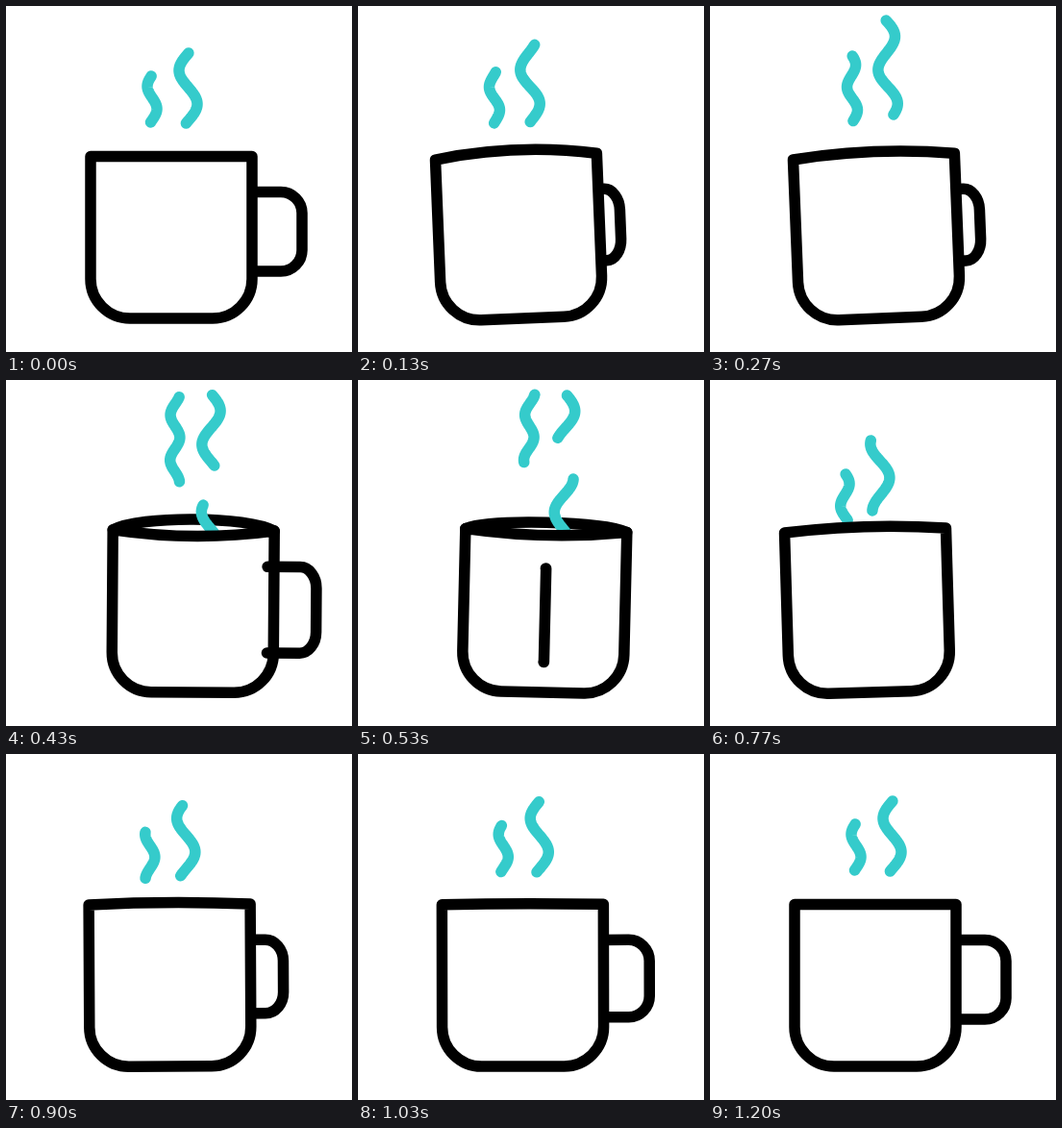
Recreate the animation shown at these times as an HTML page with a canvas. Size 360 px wide and 360 px high, loop 1670 ms.

```html
<!DOCTYPE html>
<html lang="en">
<head>
<meta charset="utf-8">
<title>Hot drink</title>
<style>
  html, body { margin: 0; height: 100%; overflow: hidden; background: #fff; }
  canvas { display: block; width: 360px; height: 360px; }
</style>
</head>
<body>
<canvas id="stage" width="360" height="360"></canvas>
<script>
const LOOP = 1670, SETTLED = 1200;

// The mug winds up, swings its handle across the front and comes round the back
const poses = [
  { time: 0, shift: 0, tilt: 0, turn: 0, bulge: 0 },
  { time: 190, shift: -1, tilt: -3, turn: -42, bulge: -9 },
  { time: 430, shift: 22, tilt: 0.4, turn: 28, bulge: 6 },
  { time: 630, shift: 15, tilt: 1.8, turn: 166, bulge: 3 },
  { time: 770, shift: -5.5, tilt: -1.7, turn: 275, bulge: -4 },
  { time: 900, shift: -1, tilt: -0.3, turn: 337, bulge: -2 },
  { time: SETTLED, shift: 0, tilt: 0, turn: 360, bulge: 0 }
];

// A wisp is the stretch of a fixed wave between top and bottom.
// topOut and bottomOut are the times at which its ends reach the ceiling.
const CEILING = 15.5;
const wisps = [
  { x: 152, swing: 5, crest: 107, period: 47, top: 73, bottom: 121,
    topOut: 440, bottomOut: 700, power: 4, rise: 57 },
  { x: 189.5, swing: 9.5, crest: 102, period: 70, top: 49, bottom: 122,
    topOut: 270, bottomOut: 636, power: 3, rise: 33 }
];

const ctx = document.getElementById('stage').getContext('2d');

// Monotone cubic interpolation, at rest at both ends
function pose(key, t) {
  const last = poses.length - 1;
  if (t >= SETTLED) return poses[last][key];
  const slope = i => (poses[i + 1][key] - poses[i][key]) / (poses[i + 1].time - poses[i].time);
  const tangent = i => {
    if (i === 0 || i === last) return 0;
    const a = slope(i - 1), b = slope(i);
    return a * b > 0 ? 2 * a * b / (a + b) : 0;
  };
  const i = poses.findIndex(p => p.time > t) - 1;
  const from = poses[i], to = poses[i + 1];
  const span = to.time - from.time, u = (t - from.time) / span, v = 1 - u;
  return from[key] * v * v * (1 + 2 * u) + to[key] * u * u * (3 - 2 * u)
    + span * u * v * (v * tangent(i) - u * tangent(i + 1));
}

function drawHandle(angle) {
  const c = Math.cos(angle), s = Math.sin(angle);
  const reach = r => 172 + r * c * (1 + 0.15 * s * r / 136);
  const inner = reach(84), outer = reach(136);
  const drop = 2.5 * (1 - c), top = 193.5 + drop, bottom = 276 + drop + 15 * s;
  const corner = outer - 22 * c * Math.abs(c), mid = corner + (outer - corner) * 0.55;
  ctx.beginPath();
  ctx.moveTo(inner, top);
  ctx.lineTo(corner, top);
  ctx.bezierCurveTo(mid, top, outer, top + 10, outer, top + 22);
  ctx.lineTo(outer, bottom - 22);
  ctx.bezierCurveTo(outer, bottom - 10, mid, bottom, corner, bottom);
  ctx.lineTo(inner, bottom);
  ctx.stroke();
}

function drawBackRim(bulge) {
  const y = 156.5 - 0.43 * bulge * bulge;
  ctx.beginPath();
  ctx.moveTo(88, 156.5);
  ctx.bezierCurveTo(116, y, 228, y, 256, 156.5);
  ctx.stroke();
}

function drawBody(bulge) {
  ctx.beginPath();
  ctx.moveTo(88, 156.5);
  ctx.quadraticCurveTo(172, 156.5 + 2 * bulge, 256, 156.5);
  ctx.arcTo(256, 325, 216, 325, 41);
  ctx.arcTo(88, 325, 88, 285, 41);
  ctx.closePath();
  ctx.fill();
  ctx.stroke();
}

function drawWave(wisp, start, end) {
  if (end <= start) return;
  ctx.beginPath();
  for (let i = 0; i <= 60; i++) {
    const y = start + (end - start) * i / 60;
    ctx.lineTo(wisp.x + wisp.swing * Math.cos(2 * Math.PI * (y - wisp.crest) / wisp.period), y);
  }
  ctx.stroke();
}

function drawWisp(wisp, t) {
  const leave = (y, out, power) => y - (y - CEILING) * Math.min(1, t / out) ** power;
  drawWave(wisp, leave(wisp.top, wisp.topOut, 2), leave(wisp.bottom, wisp.bottomOut, wisp.power));

  // The next wisp rises out of the mug and slows to rest
  const below = wisp.rise * (Math.max(0, SETTLED - t) / 570) ** 3;
  if (t > 300) drawWave(wisp, wisp.top + below, wisp.bottom + below);
}

function draw(t) {
  const angle = pose('turn', t) * Math.PI / 180;
  const bulge = pose('bulge', t);
  const inFront = Math.sin(angle) > 0;

  ctx.fillStyle = '#fff';
  ctx.fillRect(0, 0, 360, 360);
  ctx.save();
  ctx.translate(172 + pose('shift', t), 325);
  ctx.rotate(pose('tilt', t) * Math.PI / 180);
  ctx.translate(-172, -325);
  ctx.lineWidth = 11.5;
  ctx.lineCap = ctx.lineJoin = 'round';

  ctx.strokeStyle = '#000';
  if (!inFront) drawHandle(angle);
  if (bulge > 0) drawBackRim(bulge);
  ctx.strokeStyle = '#35cbcb';
  wisps.forEach(wisp => drawWisp(wisp, t));
  ctx.strokeStyle = '#000';
  drawBody(bulge);
  if (inFront) drawHandle(angle);
  ctx.restore();
}

const begin = performance.now();
function tick() {
  draw((performance.now() - begin) % LOOP);
  requestAnimationFrame(tick);
}
tick();
</script>
</body>
</html>
```
